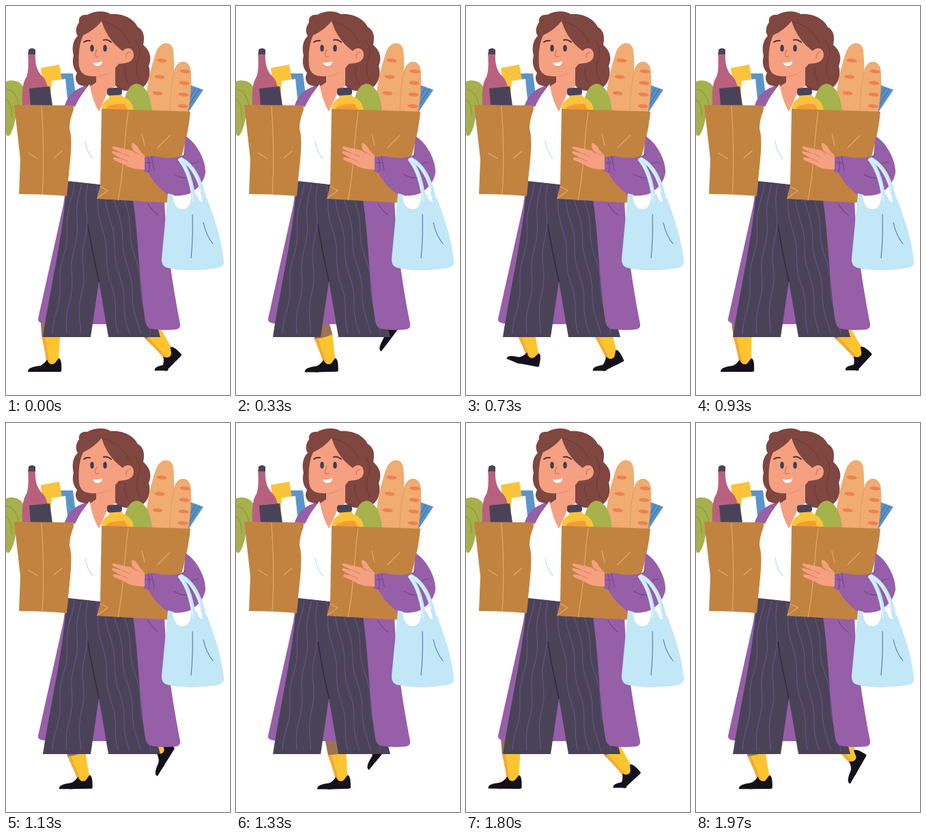
Write an HTML page that moves like this. It is 328x571 px and loops after 2010 ms.

```html
<!DOCTYPE html>
<html lang="en">
<head>
<meta charset="utf-8">
<title>Walking home with groceries</title>
<style>
html, body { margin: 0; width: 100%; height: 100%; overflow: hidden; background: #fff; }
svg { display: block; width: 328px; height: 571px; }
.line { fill: none; stroke-linecap: round; stroke-linejoin: round; }
.skin { fill: #f5a080; }
.hair { fill: #804640; }
.coat { fill: #965fa8; }
.kraft { fill: #c28340; }
.dark { fill: #4a4358; }
.bread { fill: #f0ac71; }
.fold { stroke: #e0a970; stroke-width: 1.2; }
.crease { stroke: #71458b; stroke-width: 1.2; }
</style>
</head>
<body>
<svg viewBox="0 0 328 571">
  <defs>
    <g id="shin">
      <path fill="#9c7453" d="M-13-72C-13-83 13-83 13-72L14-33H-13Z"/>
      <path fill="#fcc42f" d="M-13-36Q0-33 14-36C12-22 10-12 9 4Q0 12-9 7C-9-8-11-20-13-36Z"/>
      <path fill="#f5a935" d="M-13-36L-8-35C-7-20-6-8-4 9L-9 7C-9-8-11-20-13-36Z"/>
    </g>
    <path id="heel" fill="#15111a" d="M-21 17V9C-14 7-11 3-8-1C-6 7 2 8 5 2L9-3C12-2 13 3 13 9V15Q13 17 10 17Z"/>
    <path id="toe" fill="#15111a" d="M-36 17C-37 11-27 9-18 8L-16 17Z"/>
    <ellipse id="score" rx="7.5" ry="2.8" fill="#ee8053" transform="rotate(5)"/>
  </defs>

  <g id="legs"></g>

  <!-- coat and trousers -->
  <path class="coat" d="M88 262L84 292L47 459Q46 465 56 466L100 467H148L190 420V280Z"/>
  <path class="dark" d="M90 256L138 262L188 287C197 350 211 430 226 486H150L136 404L124 486H54C64 420 80 350 86 292Z"/>
  <path id="stripes" class="line" stroke="#6d4f92" stroke-width="1.1"/>
  <path class="line" stroke="#2f293d" stroke-width="1.5" d="M120 321C124 350 130 376 136 404"/>
  <path class="coat" d="M186 284H232C234 340 242 400 255 467Q256 475 246 475Q230 477 213 474Q206 473 204 463C195 405 194 340 186 284Z"/>
  <path class="line crease" d="M208 290Q215 302 223 307"/>

  <!-- left bag and its contents -->
  <path fill="#a6b04c" d="M0 111C8 107 20 110 24 117C32 125 31 140 28 152H15C15 164 11 183 5 190Q0 192 0 186Z"/>
  <path class="line" stroke="#8c993c" stroke-width="1.2" d="M0 122Q15 124 19 146M0 137Q9 143 8 162"/>
  <path fill="#5b95c8" d="M77 99L98 99L104 146H80Z"/>
  <path fill="#fbc33b" d="M51 91L78 86L82 109L70 146H58Z"/>
  <path fill="#fff" d="M67 110L87 107L91 146H64Z"/>
  <path fill="#b8617e" d="M32 68H43C42 84 45 96 54 104Q63 113 64 146H24C23 122 25 112 30 104Q34 94 32 68Z"/>
  <path class="dark" d="M33 64Q38 60 43 64L43 71H33ZM34 121L64 118L68 146H36Z"/>
  <path class="coat" d="M86 146C91 130 101 121 121 116L120 150Z"/>
  <path class="kraft" d="M12 145L99 146L97 200L89 279Q55 276 19 276L21 225Z"/>
  <path class="line fold" d="M52 147Q57 215 53 277M33 216L46 224M82 213L70 223"/>

  <!-- hair, neck and blouse -->
  <path class="hair" d="M107 24C105 14 115 12 119 13C130 6 147 7 153 12C172 10 188 20 193 31C203 36 203 48 201 57C211 66 214 76 209 88C214 105 205 121 192 123C175 128 158 122 157 108L134 118Q116 120 106 115Q99 108 104 98C97 90 97 80 99 73C96 62 98 50 105 44C100 36 104 28 107 24Z"/>
  <path fill="#fff" d="M122 115L111 130C100 147 93 164 93 180C97 194 96 210 91 257L139 262L152 150L151 120L136 145Z"/>
  <path class="skin" d="M132 95V112L123 118Q127 140 136 155L138 151L150 124L160 118V88Z"/>
  <path class="line" stroke="#e07a58" stroke-width="1.2" d="M134 103Q148 102 157 92"/>
  <path class="line" stroke="#b9dcec" stroke-width="1.2" d="M116 198Q118 214 127 224"/>

  <!-- face -->
  <path class="skin" d="M113 43C106 57 106 76 107 88Q109 102 124 103C143 105 156 97 165 85C176 84 187 83 187 71C186 60 176 60 171 66C160 58 147 45 140 22Q130 35 113 43Z"/>
  <path class="line" stroke="#6c3937" d="M141 23C157 25 175 39 180 54M190 50Q200 65 193 80Q188 96 196 109M175 89Q171 103 181 116"/>
  <path class="line" stroke="#d8704f" stroke-width="1.2" d="M176 76Q176 67 182 68M133 64Q129 72 132 75L136 74"/>
  <path class="line" stroke="#55303a" stroke-width="2" d="M114 53Q118 50 123 51M143 50Q148 48 154 53"/>
  <g fill="#3f3c50">
    <ellipse cx="126" cy="62" rx="2.7" ry="4.9"/>
    <ellipse cx="145" cy="62" rx="2.7" ry="4.9"/>
  </g>
  <path fill="#fff" d="M127 83Q134 84 141 81Q141 88 134 88Q129 88 127 83Z"/>

  <!-- right bag contents -->
  <path fill="#5b90c6" d="M270 116L289 123L267 156H260Z"/>
  <path class="line" stroke="#3e78ac" stroke-width="1.3" d="M283 122L266 149M278 120L268 136"/>
  <path class="bread" d="M205 156C202 130 213 86 220 67C226 51 243 50 245 66C248 92 245 130 241 157Z"/>
  <path class="bread" stroke="#d9925b" stroke-width=".7" d="M240 157C240 132 243 105 248 91C254 78 268 80 270 94C272 116 270 140 266 157Z"/>
  <g id="scores"></g>
  <path fill="#a6b24c" d="M171 156C172 133 179 115 191 114C205 115 213 136 214 156Z"/>
  <path fill="#fbc33b" d="M140 155Q139 141 151 135L151 130L169 129L171 133Q187 139 187 156Z"/>
  <path fill="#f59b35" d="M144 155L148 148Q160 143 174 144L180 156Z"/>
  <rect class="dark" x="148" y="120" width="22" height="11" rx="4" transform="rotate(-4 159 126)"/>

  <!-- right bag, arm and hand -->
  <path class="kraft" d="M140 151L270 155C267 190 257 218 253 239L240 289L133 283L138 263Z"/>
  <path class="line fold" d="M179 155C172 200 174 235 164 285M134 282L149 271L138 265M199 188L203 205M240 190L222 208"/>
  <path class="coat" d="M202 222L216 220C234 224 249 224 260 219L263 191C279 201 293 226 292 245C288 268 264 284 240 279C228 271 214 258 209 245L202 243Z"/>
  <path class="line crease" d="M208 222Q212 233 209 244M205 230H213M213 221L217 241M262 217L252 230M282 229Q272 229 266 238M246 247Q257 254 266 252"/>
  <path class="skin" d="M203 222L186 212Q182 201 185 201Q191 202 195 211L203 220V240C190 240 181 238 174 233L158 226Q155 223 159 222L169 224L157 217Q153 214 157 213L172 217L157 210Q154 207 157 206L184 212Z"/>
  <path class="line" stroke="#dd7958" stroke-width=".9" d="M169 224L178 228M172 217L181 221M184 212L190 217"/>

  <!-- carrier bag -->
  <path fill="#c2e7f7" d="M237 275L245 277Q247 298 260 298Q270 297 271 278L279 276Q284 291 289 287L294 282C304 308 316 342 319 374Q321 383 307 385C280 389 255 389 235 384Q227 381 228 370Z"/>
  <path fill="#fff" d="M244 278Q257 280 271 275Q272 297 258 298Q246 298 244 278Z"/>
  <path class="line" stroke="#c2e7f7" stroke-width="6" d="M255 226C267 241 272 260 277 294M257 225C273 234 284 252 291 287"/>
  <path class="line" stroke="#def3fb" stroke-width="2" d="M254 225C266 241 271 260 274 286M257 225C273 235 281 252 286 272"/>
  <path class="line" stroke="#5874a6" stroke-width="1.1" d="M273 306Q274 340 271 370M289 318Q293 337 303 349"/>
</svg>
<script>
const LOOP = 2010, STRIDE = 1822, FLOOR = 537, SHIN = 80;

// ankle poses through one stride
const POSES = [
  { at: 0, x: 68, y: 520, tilt: 0 },       // contact
  { at: 570, x: 184, y: 520, tilt: -3 },   // end of stance
  { at: 720, x: 211, y: 512, tilt: -25 },  // heel off
  { at: 930, x: 237, y: 509, tilt: -47 },  // push off
  { at: 1060, x: 229, y: 490, tilt: -60 }, // lift
  { at: 1240, x: 221, y: 468, tilt: -53 }, // highest
  { at: 1480, x: 157, y: 482, tilt: -45 }, // swing
  { at: 1630, x: 100, y: 510, tilt: 11 },  // reach
  { at: STRIDE, x: 68, y: 520, tilt: 0 }
];

const secant = (i, key) =>
  (POSES[i + 1][key] - POSES[i][key]) / (POSES[i + 1].at - POSES[i].at);

// harmonic mean of the neighbours, so the curve never overshoots a pose
function slope(i, key) {
  if (i === 0) return secant(0, key);
  if (i === POSES.length - 1) return 0;
  const a = secant(i - 1, key), b = secant(i, key);
  return a * b > 0 ? 2 * a * b / (a + b) : 0;
}

function pose(time, key) {
  const i = POSES.findIndex(p => p.at > time) - 1;
  const a = POSES[i], b = POSES[i + 1], span = b.at - a.at;
  const u = (time - a.at) / span, v = 1 - u;
  return a[key] + (b[key] - a[key]) * u * u * (3 - 2 * u)
    + span * u * v * (v * slope(i, key) - u * slope(i + 1, key));
}

// the knee swings like a pendulum and stays straighter in stance
function kneeX(time) {
  const a = 2 * Math.PI * time / STRIDE;
  return 125 - 63 * Math.cos(a) + 22 * Math.max(0, Math.sin(a)) ** 2;
}

function use(id, parent, transform = '') {
  const el = document.createElementNS('http://www.w3.org/2000/svg', 'use');
  el.setAttribute('href', '#' + id);
  el.setAttribute('transform', transform);
  return parent.appendChild(el);
}

const byId = id => document.getElementById(id);
const legs = [STRIDE / 2, 0].map(offset => ({
  offset,
  shin: use('shin', byId('legs')),
  heel: use('heel', byId('legs')),
  toe: use('toe', byId('legs'))
}));

function moveLeg(leg, time) {
  const x = pose(time, 'x'), y = pose(time, 'y'), tilt = pose(time, 'tilt');
  const r = tilt * Math.PI / 180, deg = 180 / Math.PI;
  const lean = -Math.asin((x - kneeX(time)) / SHIN) * deg;
  // the toe lies flat while the ball of the foot is near the floor
  const ball = y + 17 * Math.cos(r) - 20 * Math.sin(r);
  const grip = Math.min(1, Math.max(0, (ball - FLOOR + 16) / 10));
  const bend = tilt < 0 ? -tilt * grip : tilt;
  const at = `translate(${x} ${y})`;
  leg.shin.setAttribute('transform', `${at} rotate(${lean})`);
  leg.heel.setAttribute('transform', `${at} rotate(${tilt})`);
  leg.toe.setAttribute('transform', `${at} rotate(${tilt}) rotate(${bend} -19 16)`);
}

function stripe(x0, y0, x1, phase) {
  let d = '';
  for (let u = 0; u <= 1; u += 0.02) {
    const y = y0 + (485 - y0) * u;
    const x = x0 + (x1 - x0) * u + 2 * Math.sin(y / 13 + phase);
    d += `${d ? 'L' : 'M'}${x.toFixed(1)} ${y.toFixed(1)}`;
  }
  return d;
}

let stripes = '';
for (let i = 0; i < 3; i++) stripes += stripe(98 + 11 * i, 260 + i, 69 + 19 * i, i);
for (let i = 0; i < 4; i++) stripes += stripe(131 + 14 * i, 264 + 6 * i, 166 + 15 * i, i);
byId('stripes').setAttribute('d', stripes);

for (let i = 0; i < 3; i++) use('score', byId('scores'), `translate(${228 - 3 * i} ${80 + 24 * i})`);
for (let i = 0; i < 4; i++) use('score', byId('scores'), `translate(${262 - i} ${96 + 17 * i})`);

function draw() {
  const t = performance.now() % LOOP;
  for (const leg of legs) moveLeg(leg, (t + leg.offset) % STRIDE);
  requestAnimationFrame(draw);
}
draw();
</script>
</body>
</html>
```
